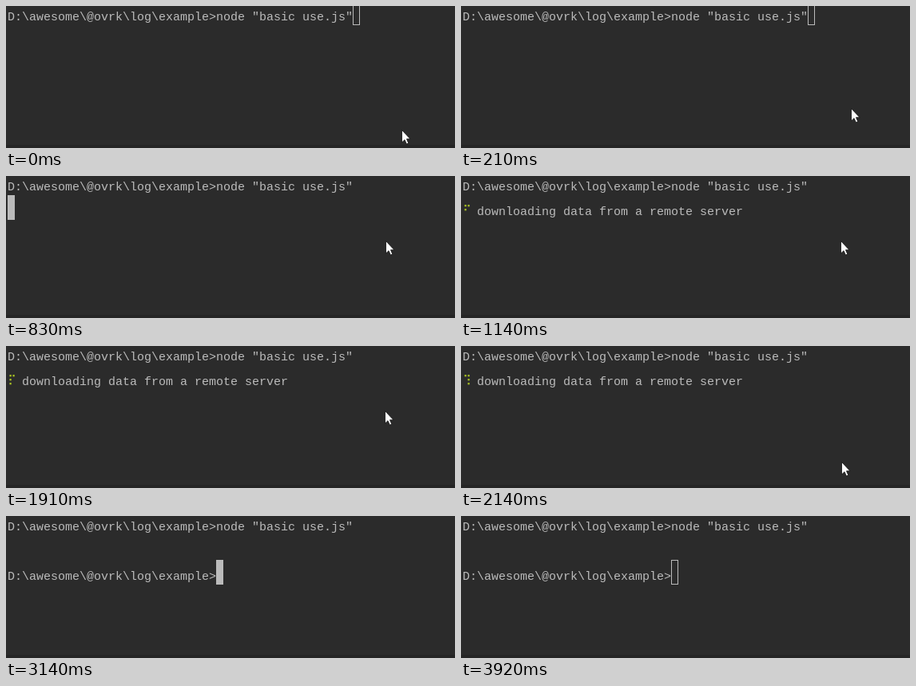
Animation of 562 by 178 pixels, one loop 4 s. Source, as an HTML page:

```html
<!DOCTYPE html>
<html lang="en">
<head>
<meta charset="utf-8">
<title>Terminal spinner</title>
<style>
  html, body { margin: 0; width: 100%; height: 100%; overflow: hidden; background: #2b2b2b; }
  svg { display: block; }
  text { font: 15px "Liberation Mono", monospace; fill: #bbb; white-space: pre; }
  #caret { stroke: #bbb; }
  #spinner { fill: #a8c023; }
</style>
</head>
<body>
<svg width="562" height="178" viewBox="0 0 562 178">
  <rect width="562" height="178" fill="#2b2b2b"/>
  <rect y="174" width="562" height="4" fill="#252525"/>
  <text x="2" y="18">D:\awesome\@ovrk\log\example&gt;node "basic use.js"</text>
  <g id="status">
    <g id="spinner"></g>
    <text x="20" y="49">downloading data from a remote server</text>
  </g>
  <text id="prompt" x="2" y="80">D:\awesome\@ovrk\log\example&gt;</text>
  <rect id="caret" width="8" height="30"/>
  <path id="mouse" d="M.5 .5V16L4 12.7L6.4 18L8.8 17L6.5 11.7H11Z" fill="#fff" stroke="#111" stroke-width=".8"/>
</svg>
<script>
const LOOP = 4000;
const $ = id => document.getElementById(id);
const show = (el, on) => el.setAttribute("visibility", on ? "visible" : "hidden");

// Latest entry [time, ...values] that has started at time t.
const held = (steps, t) => steps.findLast(step => step[0] <= t);

// [time, x, y, filled]; an entry without a position hides the caret.
const caretSteps = [
  [0, 434, -7, false], [375, 434, -7, true], [825, 2, 24, true],
  [1135], [3135, 263, 55, true], [3915, 263, 55, false]
];
const mouseSteps = [
  [0, 495, 155], [68, 494, 150], [145, 488, 128], [218, 480, 100], [295, 475, 81],
  [1905, 474, 81], [1982, 477, 96], [2059, 478, 120], [2136, 476, 145],
  [2213, 474, 163], [2290]
];
const firstTurn = [
  [1135, 0], [1215, 1], [1365, 3], [1445, 4], [1595, 6], [1765, 7], [1828, 8]
];

// Braille spinner: digits are the lit dots, 1-3 left column, 4-6 right column.
const glyphs = ["124", "145", "1456", "456", "3456", "356", "236", "1236", "123", "1234"];
const dots = Array.from({ length: 6 }, (_, i) => {
  const dot = document.createElementNS("http://www.w3.org/2000/svg", "rect");
  const box = { x: i < 3 ? 4.5 : 8.5, y: 36 + i % 3 * 5, width: 2.2, height: 2.4 };
  for (const key in box) dot.setAttribute(key, box[key]);
  return $("spinner").appendChild(dot);
});

function spinnerIndex(t) {
  return t < 1905 ? held(firstTurn, t)[1] : (9 + Math.floor((t - 1905) / 77)) % 10;
}

function draw(now) {
  const t = now % LOOP;
  const busy = t >= 1135 && t < 3135;
  show($("status"), busy);
  show($("prompt"), t >= 3135);
  const lit = busy ? glyphs[spinnerIndex(t)] : "";
  dots.forEach((dot, i) => dot.setAttribute("opacity", lit.includes(i + 1) ? 1 : 0));

  const [, x, y, filled] = held(caretSteps, t);
  const caret = $("caret");
  show(caret, x !== undefined);
  if (x !== undefined) {
    caret.setAttribute("x", x + .5);
    caret.setAttribute("y", y + .5);
    caret.setAttribute("fill", filled ? "#bbb" : "none");
  }

  const [, mx, my] = held(mouseSteps, t);
  show($("mouse"), mx !== undefined);
  if (mx !== undefined) $("mouse").setAttribute("transform", `translate(${mx} ${my})`);
}

function tick() {
  draw(performance.now());
  requestAnimationFrame(tick);
}
draw(0);
requestAnimationFrame(tick);
</script>
</body>
</html>
```
